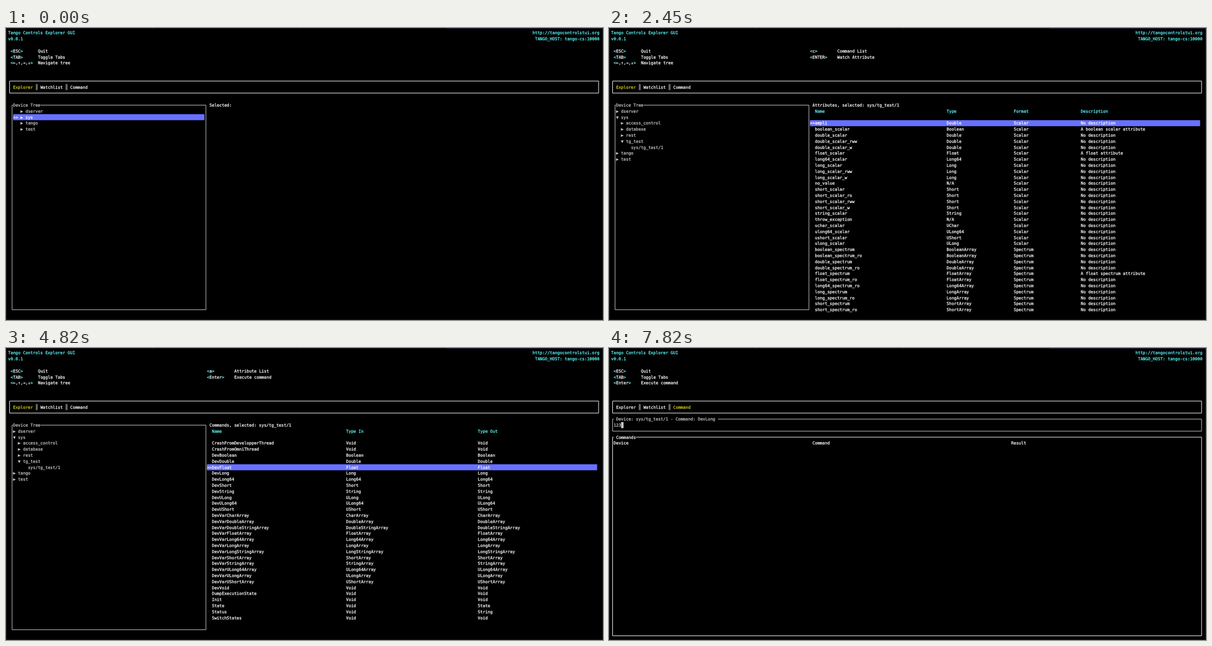
These frames come from a looping animation (1069 by 524 pixels, 8000 ms). An HTML page:

```html
<!DOCTYPE html>
<html lang="en">
<head>
<meta charset="utf-8">
<title>Tango Controls Explorer GUI</title>
<style>
html, body { margin: 0; width: 100%; height: 100%; overflow: hidden; background: #000; }
svg { display: block; width: 1069px; height: 524px; }
text {
  font: 7.3915px "DejaVu Sans Mono", "Liberation Mono", monospace;
  text-rendering: geometricPrecision;
  white-space: pre;
  stroke-width: .25px;
}
</style>
</head>
<body>
<svg id="stage" viewBox="0 0 1069 524"></svg>
<script>
const LOOP = 8000;
const CW = 4.45, RH = 10.8, X0 = 3.8, Y0 = 3.4;
const WHITE = '#fefefe', GRAY = '#c7c7c7', CYAN = '#60fdff', YELLOW = '#d6d21c',
      BLUE = '#6871ff', DIM = '#686868';
const DEVICE = 'sys/tg_test/1';

const px = col => X0 + col * CW;
const py = row => Y0 + row * RH;
const esc = s => s.replace(/&/g, '&amp;').replace(/</g, '&lt;').replace(/>/g, '&gt;');

// Terminal cell helpers: every position is a column and a row.
function put(col, row, s, color = WHITE) {
  return `<text x="${px(col).toFixed(2)}" y="${(py(row) + 7.9).toFixed(2)}" fill="${color}" stroke="${color}">${esc(s)}</text>`;
}

function rect(x, y, w, h, color) {
  return `<rect x="${x}" y="${y}" width="${w}" height="${h}" fill="${color}"/>`;
}

function cells(from, to, row, color) {
  return rect(px(from), py(row), (to - from) * CW, RH, color);
}

// Frame through cell centres; the top edge is open between two columns for a title.
function box(c1, r1, c2, r2, color, gapFrom = 0, gapTo = 0) {
  const mx = c => px(c + .5) + .4;
  const my = r => py(r + .5);
  const l = mx(c1), r = mx(c2), t = my(r1), b = my(r2);
  const top = gapTo ? `M${px(gapTo)} ${t}H${r}V${b}H${l}V${t}H${px(gapFrom)}`
                    : `M${l} ${t}H${r}V${b}H${l}Z`;
  return `<path d="${top}" fill="none" stroke="${color}"/>`;
}

function chrome() {
  return rect(0, 0, 1069, 1, '#1d1a20') + rect(790, 0, 279, 1, '#3a2b46') +
    [263, 527, 790].map(x => rect(x, 0, 1, 1, '#55505a')).join('') +
    rect(0, 0, 1, 524, '#242226') + rect(1068, 0, 1, 524, '#242226') +
    rect(0, 523, 1069, 1, '#201c22');
}

// Key names are white between cyan brackets.
function help(col, labelCol, keys) {
  return keys.map(([key, label], i) => {
    const row = 3 + i;
    return put(col, row, '<', CYAN) + put(col + 1, row, key) +
      put(col + 1 + key.length, row, '>', CYAN) + put(labelCol, row, label);
  }).join('');
}

function header(active, lastKey) {
  const tabs = [[2, 'Explorer'], [13, 'Watchlist'], [25, 'Command']];
  const url = 'http://tangocontrolstui.org', host = 'TANGO_HOST: tango-cs:10000';
  return chrome() +
    put(0, 0, 'Tango Controls Explorer GUI', CYAN) + put(0, 1, 'v0.0.1', CYAN) +
    put(238 - url.length, 0, url, CYAN) + put(238 - host.length, 1, host, CYAN) +
    help(1, 12, [['ESC', 'Quit'], ['TAB', 'Toggle Tabs'], lastKey]) +
    box(0, 8, 237, 10, WHITE) +
    tabs.map(([c, s]) => put(c, 9, s, s === active ? YELLOW : WHITE)).join('') +
    [11, 23].map(c => [-1.3, .5].map(d =>
      rect(px(c + .5) + d, py(9), .9, RH, GRAY)).join('')).join('');
}

// Tree rows: [depth, marker, name].
function treeRows(open) {
  const rows = [[0, '▶', 'dserver'], [0, open ? '▼' : '▶', 'sys']];
  if (open) {
    for (const s of ['access_control', 'database', 'rest']) rows.push([1, '▶', s]);
    rows.push([1, open > 1 ? '▼' : '▶', 'tg_test']);
    if (open > 1) rows.push([2, ' ', DEVICE]);
  }
  return rows.concat([[0, '▶', 'tango'], [0, '▶', 'test']]);
}

function tree(open, sel) {
  const shift = sel === null ? 2 : 5;
  let out = box(1, 12, 79, 46, GRAY, 2, 13) + put(2, 12, 'Device Tree', GRAY);
  treeRows(open).forEach(([depth, mark, name], i) => {
    const row = 13 + i, col = shift + depth * 2, on = name === sel;
    const color = on ? WHITE : GRAY;
    if (on) out += cells(2, 79, row, BLUE) + put(2, row, '>>');
    if (mark !== ' ') out += put(col, row, mark, color);
    out += put(col + 2, row, name, color);
  });
  return out;
}

function table(title, cols, heads, rows, sel) {
  return put(81, 12, `${title}, selected: ${DEVICE}`) +
    heads.map((h, i) => put(cols[i], 13, h, CYAN)).join('') +
    cells(80, 237, 15 + sel, BLUE) + put(80, 15 + sel, '>>') +
    rows.map((r, n) => r.map((s, i) => put(cols[i], 15 + n, s)).join('')).join('');
}

const scalars = `ampli boolean_scalar double_scalar double_scalar_rww double_scalar_w float_scalar
  long64_scalar long_scalar long_scalar_rww long_scalar_w no_value short_scalar short_scalar_ro
  short_scalar_rww short_scalar_w string_scalar throw_exception uchar_scalar ulong64_scalar
  ushort_scalar ulong_scalar`.split(/\s+/);
const spectra = `boolean_spectrum boolean_spectrum_ro double_spectrum double_spectrum_ro
  float_spectrum float_spectrum_ro long64_spectrum_ro long_spectrum long_spectrum_ro
  short_spectrum short_spectrum_ro`.split(/\s+/);
const notes = {
  boolean_scalar: 'A boolean scalar attribute',
  float_scalar: 'A float attribute',
  float_spectrum: 'A float spectrum attribute'
};
const special = { ampli: 'Double', no_value: 'N/A', throw_exception: 'N/A' };

function typeOf(name) {
  const base = name.split('_')[0].replace(/^u?./, s => s.toUpperCase());
  return special[name] || base;
}

const attributes = [
  ...scalars.map(n => [n, typeOf(n), 'Scalar', notes[n] || 'No description']),
  ...spectra.map(n => [n, typeOf(n) + 'Array', 'Spectrum', notes[n] || 'No description'])
];

const outTypes = { State: 'State', Status: 'String' };
const commands = `CrashFromDevelopperThread CrashFromOmniThread DevBoolean DevDouble DevFloat DevLong
  DevLong64 DevShort DevString DevULong DevULong64 DevUShort DevVarCharArray DevVarDoubleArray
  DevVarDoubleStringArray DevVarFloatArray DevVarLong64Array DevVarLongArray
  DevVarLongStringArray DevVarShortArray DevVarStringArray DevVarULong64Array DevVarULongArray
  DevVarUShortArray DevVoid DumpExecutionState Init State Status SwitchStates`
  .split(/\s+/).map(n => {
    const type = n.startsWith('Dev') ? n.replace(/^Dev(Var)?/, '') : 'Void';
    return [n, type, outTypes[n] || type];
  });

const explorer = () => header('Explorer', ['←,↑,→,↓', 'Navigate tree']);

function browse(open, sel, picked = '') {
  return explorer() + tree(open, sel) + put(81, 12, ('Selected: ' + picked).trim());
}

function attributeView() {
  return explorer() + tree(2, null) +
    help(80, 91, [['c', 'Command List'], ['ENTER', 'Watch Attribute']]) +
    table('Attributes', [82, 135, 162, 189], ['Name', 'Type', 'Format', 'Description'], attributes, 0);
}

function commandView(sel) {
  return explorer() + tree(2, null) +
    help(80, 91, [['a', 'Attribute List'], ['Enter', 'Execute command']]) +
    table('Commands', [82, 136, 189], ['Name', 'Type In', 'Type Out'], commands, sel);
}

function execute(typed) {
  const title = `Device: ${DEVICE} - Command: DevLong`;
  const cursor = 1 + typed.length;
  return header('Command', ['Enter', 'Execute command']) +
    box(0, 11, 237, 13, GRAY, 1, 3 + title.length) + put(2, 11, title, GRAY) +
    cells(cursor, cursor + 1, 12, GRAY) +
    (typed ? put(1, 12, typed, GRAY) : put(2, 12, 'Enter command input', DIM)) +
    box(0, 14, 237, 47, WHITE, 1, 10) + put(2, 14, 'Commands') +
    put(1, 15, 'Device') + put(81, 15, 'Command') + put(161, 15, 'Result');
}

const steps = [
  [0, browse, 0, 'sys'],
  [90, browse, 1, 'sys'],
  [820, browse, 1, 'access_control'],
  [1270, browse, 1, 'database'],
  [1450, browse, 1, 'rest'],
  [1640, browse, 1, 'tg_test'],
  [1730, browse, 2, 'tg_test'],
  [1910, browse, 2, DEVICE, DEVICE],
  [2450, attributeView],
  [3000, commandView, 0],
  [4450, commandView, 1],
  [4640, commandView, 2],
  [4730, commandView, 3],
  [4820, commandView, 4],
  [5000, commandView, 5],
  [6000, execute, ''],
  [6820, execute, '1'],
  [7550, execute, '12'],
  [7820, execute, '123']
];

const stage = document.getElementById('stage');
const start = performance.now();
let shown = -1;

function draw() {
  const t = (performance.now() - start) % LOOP;
  let i = steps.length - 1;
  while (steps[i][0] > t) i--;
  if (i !== shown) {
    const [, view, ...args] = steps[i];
    stage.innerHTML = view(...args);
    shown = i;
  }
  requestAnimationFrame(draw);
}
draw();
</script>
</body>
</html>
```
